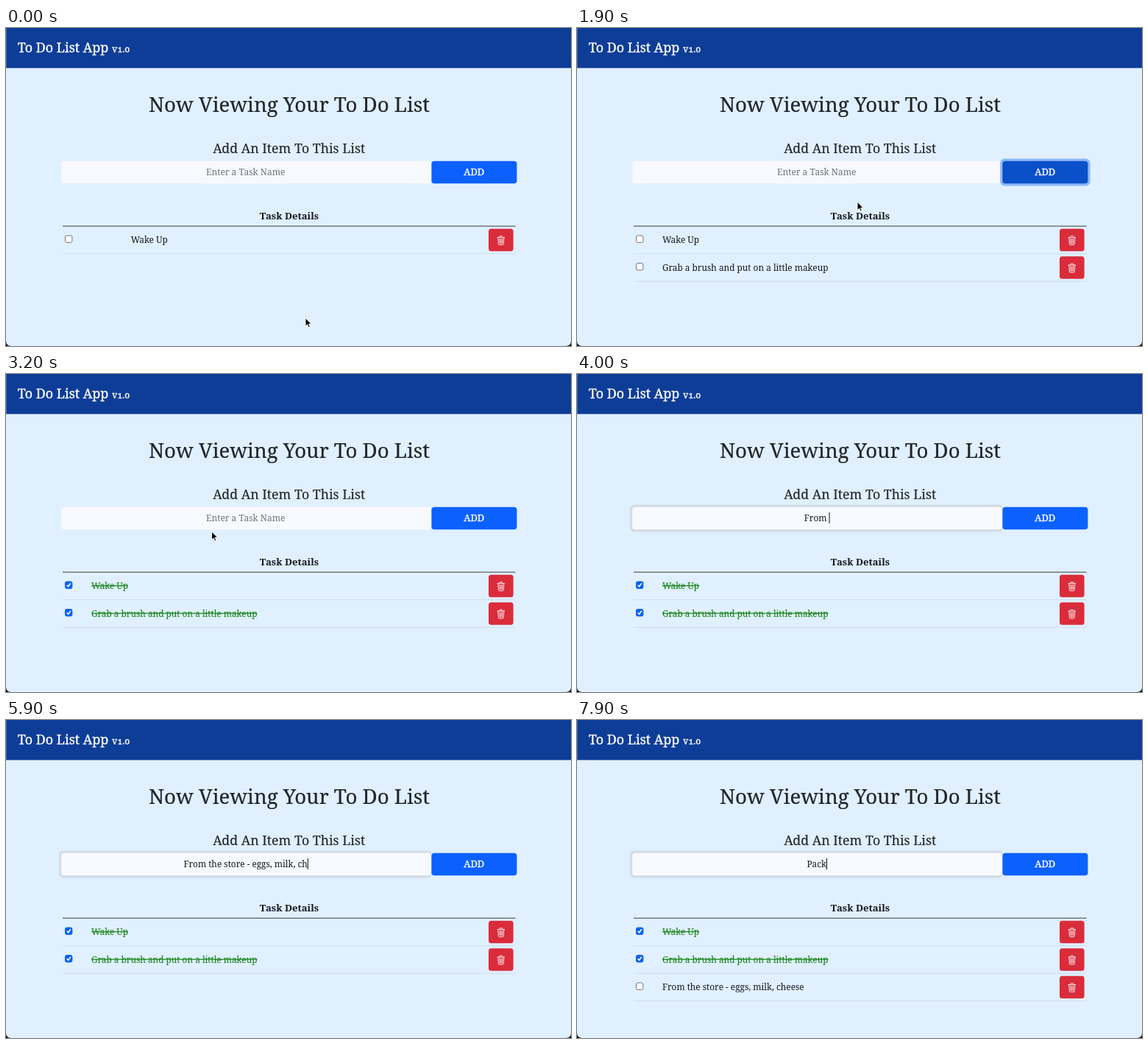
An HTML page for the animation above (8 s loop, 768x432 px).

```html
<!DOCTYPE html>
<html lang="en">
<head>
<meta charset="utf-8">
<title>To Do List App</title>
<style>
  html, body { margin: 0; width: 100%; height: 100%; overflow: hidden; background: #0b0d12; }
  svg { display: block; width: 768px; height: 432px; }
  text { font: 11.85px "Noto Serif", Georgia, serif; fill: #16191d; white-space: pre; }
  .mid { text-anchor: middle; }
  .light { fill: #fff; stroke: #fff; stroke-width: .35px; }
  .brand { font-size: 17.9px; }
  .version { font-size: 12px; font-variant-numeric: oldstyle-nums; }
  .h1 { font-size: 27.65px; fill: #212529; stroke: #212529; stroke-width: .2px; }
  .h4 { font-size: 17.75px; fill: #212529; stroke: #212529; stroke-width: .15px; }
  .th { font-size: 13.1px; font-weight: 700; }
  .btn { font-size: 13px; }
  .hint { font-size: 12px; fill: #6c737b; }
  .done text { fill: #128012; text-decoration: line-through; }
  .check { fill: #fff; stroke: #767676; }
  .done .check { fill: #0b62f2; stroke: #0b62f2; }
  .tick { display: none; }
  .done .tick { display: inline; }
</style>
</head>
<body>
<svg viewBox="0 0 768 432">
  <defs>
    <g id="trash" fill="none" stroke="#fff" stroke-width="1.1" stroke-linecap="round" stroke-linejoin="round">
      <path d="M2 3H14M5.5 3V1.5Q5.5.6 6.4.6H9.6Q10.5.6 10.5 1.5V3M3 3.2L3.8 14.2Q3.9 15.4 5 15.4H11Q12.1 15.4 12.2 14.2L13 3.2M5.7 5.4L6 13M8 5.4V13M10.3 5.4L10 13"/>
    </g>
  </defs>
  <path fill="#e0f0ff" d="M0 0H768V425Q768 432 761 432H7Q0 432 0 425Z"/>
  <rect width="768" height="54.4" fill="#0e3d97"/>
  <rect width=".6" height="54.4" fill="#6f88b8"/>
  <text class="light brand" x="15.8" y="33">To Do List App</text>
  <text class="light version" x="144.3" y="33">v1.0</text>
  <text class="mid h1" x="385" y="113.5">Now Viewing Your To Do List</text>
  <text class="mid h4" x="384.7" y="169.5">Add An Item To This List</text>

  <rect id="inputRing" x="72" y="177.6" width="507" height="36.8" rx="6" fill="#d3dce5"/>
  <rect x="75.2" y="180.8" width="502.6" height="30.4" rx="4" fill="#f8f9ff"/>
  <text id="field" class="mid" x="325.7" y="200"></text>
  <rect id="caret" y="188" width="1" height="15" fill="#111"/>
  <rect id="addRing" x="575.2" y="177.6" width="122.4" height="36.8" rx="6" fill="#8db8fb"/>
  <rect id="add" x="578.4" y="180.8" width="116" height="30.4" rx="4"/>
  <text class="mid light btn" x="636.3" y="200">ADD</text>

  <text class="mid th" x="385" y="260">Task Details</text>
  <g id="rows"></g>
  <rect x="77" y="268.7" width="615.5" height=".9" fill="#25292d"/>

  <g id="mouse">
    <path id="arrow" fill="#000" stroke="#fff" stroke-width=".9" stroke-linejoin="round"
      d="M0 0V11.2L2.6 8.8L4.4 12.8L6.2 12L4.5 8.1H8Z"/>
    <path id="hand" fill="#fff" stroke="#111" stroke-width=".9" stroke-linejoin="round"
      d="M-1.2 7.5V1Q-1 -.4 0 -.4Q1 -.4 1.2 1V5Q2.3 4.2 3.1 5.2Q4.2 4.6 4.8 5.7Q6.4 5.4 6.4 7V9.5Q6.2 11 5.3 12V13.5H-.6V12.2L-4 8.4Q-4.6 7.2 -3.5 6.8Q-2.6 6.6 -1.2 8.2Z"/>
    <path id="beam" fill="none" stroke="#222" d="M-2.5 -6.5Q0 -6.5 0 -5V5Q0 6.5 -2.5 6.5M2.5 -6.5Q0 -6.5 0 -5M0 5Q0 6.5 2.5 6.5"/>
  </g>
</svg>
<script>
const LOOP = 8000, ROW = 37.5, TOP = 269.5;
const $ = id => document.getElementById(id);

const tasks = [
  { text: 'Wake Up', added: 0, done: 2400 },
  { text: 'Grab a brush and put on a little makeup', added: 1450, done: 2880 },
  { text: 'From the store - eggs, milk, cheese', added: 6850, done: Infinity }
];

// Each entry is typed from `start`, one letter per `step` ms, until `clear`.
const entries = [
  { text: tasks[1].text, start: 450, step: 11, clear: 1450 },
  { text: tasks[2].text, start: 3670, step: 73, clear: 6850 },
  { text: 'Pack', start: 7620, step: 73, clear: LOOP }
];

const inputFocus = [[390, 1270], [3420, 6750], [7400, LOOP]];
const addFocus = [[1270, 2390], [6750, 7400]];
const mouseHidden = [[450, 880], [3670, 6250], [7620, LOOP]];

// time, x, y of the pointer tip
const path = [
  [0, 407, 394], [100, 407, 394], [380, 340, 197], [880, 340, 197],
  [1250, 624.5, 194.5], [1550, 624.5, 194.5], [2300, 86, 287], [2450, 86, 288],
  [2700, 91, 301], [2830, 86, 324], [2940, 86, 324], [3200, 279.5, 214],
  [3400, 340, 197], [6250, 340, 197], [6640, 640, 197], [6850, 640, 197],
  [7020, 704, 202], [7350, 350, 198], [LOOP, 350, 198]
];

const within = (t, spans) => spans.some(([a, b]) => t >= a && t < b);
const inBox = ([x, y], l, t, r, b) => x >= l && x < r && y >= t && y < b;
const show = (el, on) => el.style.display = on ? '' : 'none';

function pointer(t) {
  const i = path.findIndex(p => p[0] > t);
  const [t0, x0, y0] = path[i - 1], [t1, x1, y1] = path[i];
  const u = (t - t0) / (t1 - t0), e = u * u * (3 - 2 * u);
  return [x0 + (x1 - x0) * e, y0 + (y1 - y0) * e];
}

$('rows').innerHTML = tasks.map((task, i) => `
  <g transform="translate(0 ${TOP + i * ROW})">
    <rect class="hover" x="77" width="615.5" height="37" fill="#ccdce6"/>
    <rect x="77" y="36.8" width="615.5" height=".8" fill="#cdd9e3"/>
    <rect class="check" x="80.5" y="12.5" width="9.4" height="9.4" rx="2"/>
    <path class="tick" d="M82.7 17.3L84.6 19.3L87.8 14.8" fill="none" stroke="#fff" stroke-width="1.5"/>
    <text y="22.5">${task.text}</text>
    <rect x="656" y="3.3" width="33.6" height="30.4" rx="3.5" fill="#da2c3b"/>
    <use href="#trash" transform="translate(666.4 12.7) scale(.8)"/>
  </g>`).join('');
const rows = [...$('rows').children];

function drawField(t) {
  const focused = within(t, inputFocus);
  const entry = entries.find(e => t >= e.start && t < e.clear);
  const field = $('field');
  const count = entry ? Math.floor((t - entry.start) / entry.step) + 1 : 0;
  field.textContent = entry ? entry.text.slice(0, count) : 'Enter a Task Name';
  field.classList.toggle('hint', !entry);
  show($('inputRing'), focused);
  show($('caret'), focused);
  const width = entry ? field.getComputedTextLength() : 0;
  $('caret').setAttribute('x', 325.7 + width / 2);
}

function drawRows(t, tip, visible) {
  tasks.forEach((task, i) => {
    const row = rows[i], y = TOP + i * ROW;
    show(row, t >= task.added);
    row.classList.toggle('done', t >= task.done);
    show(row.querySelector('.hover'), visible && inBox(tip, 77, y, 692, y + ROW));
    row.querySelector('text').setAttribute('x', t < tasks[1].added ? 169.7 : 116);
  });
}

function draw(t) {
  const tip = pointer(t), visible = !within(t, mouseHidden);
  const onAdd = visible && inBox(tip, 578, 181, 694, 211);
  const onInput = inBox(tip, 75, 181, 577, 211);
  const pressed = within(t, addFocus);

  drawField(t);
  drawRows(t, tip, visible);
  show($('addRing'), pressed);
  $('add').setAttribute('fill', onAdd || pressed ? '#0a50c9' : '#0c61fe');

  show($('mouse'), visible);
  $('mouse').setAttribute('transform', `translate(${tip})`);
  show($('hand'), onAdd);
  show($('beam'), onInput);
  show($('arrow'), !onAdd && !onInput);
}

const begin = performance.now();
function tick() {
  draw((performance.now() - begin) % LOOP);
  requestAnimationFrame(tick);
}
tick();
</script>
</body>
</html>
```
